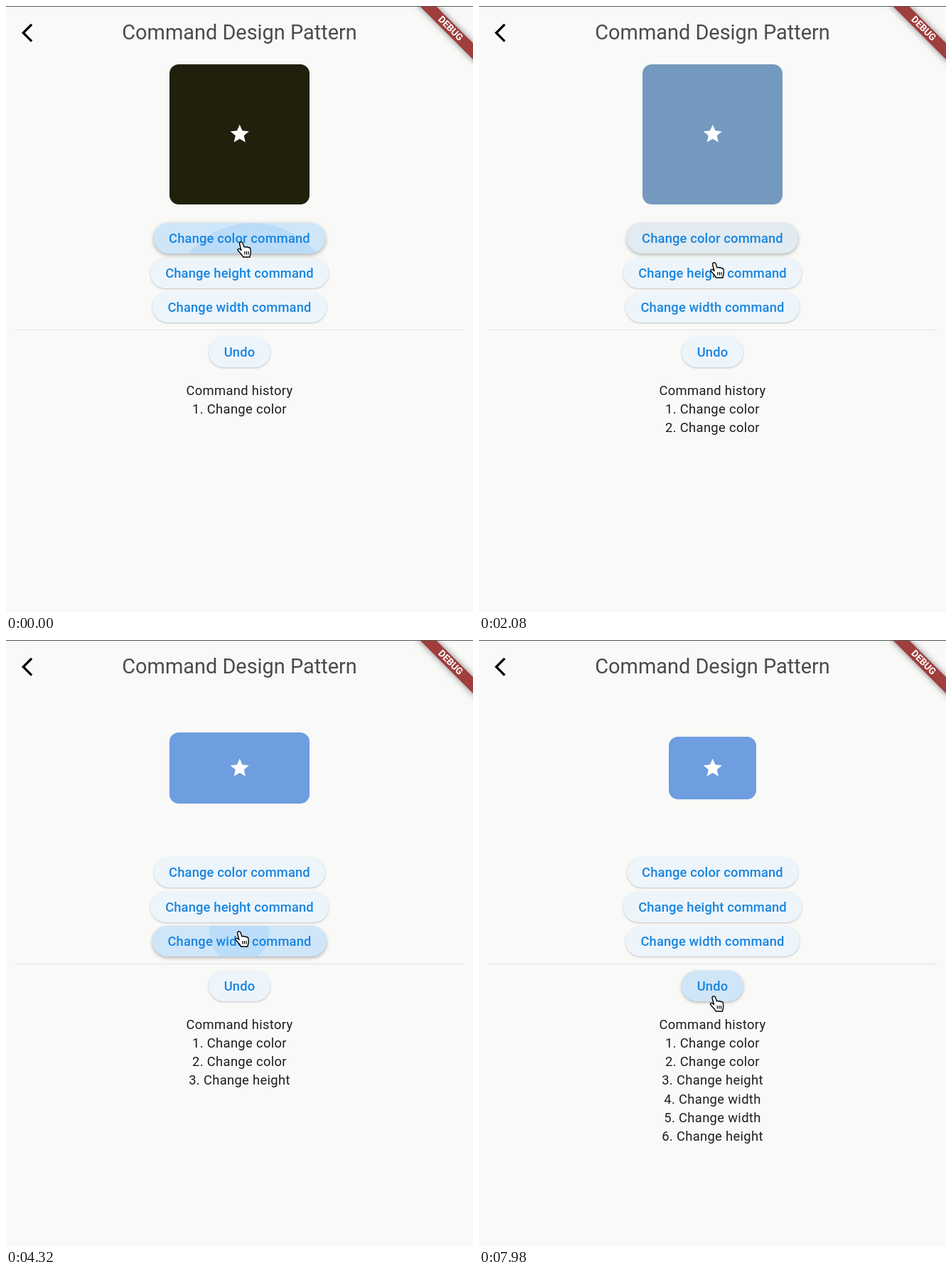
Recreate the animation shown at these times as an HTML page. Size 657 px wide and 852 px high, loop 8 s.

```html
<!DOCTYPE html>
<html lang="en">
<head>
<meta charset="utf-8">
<title>Command Design Pattern</title>
<style>
  html, body { margin: 0; width: 100%; height: 100%; overflow: hidden; }
  body { position: relative; background: #f9f9f8; font-family: Roboto, sans-serif; }
  body > * { position: absolute; }
  .rule { height: 1px; }
  #top { left: 0; top: 0; width: 657px; background: #555552; }
  #divider { left: 14px; top: 455px; width: 630px; background: #e2e2e1; }
  h1 {
    left: 0; top: 17px; width: 657px; margin: 0;
    font: 400 28.9px/40px Roboto, sans-serif; text-align: center; color: #4b4b4a;
  }
  #back { left: 21.7px; top: 22.2px; }
  #banner {
    left: 657px; top: 0; width: 0; height: 0; transform: rotate(45deg);
  }
  #banner span {
    position: absolute; left: -60px; top: 36.8px; width: 120px; height: 15.8px;
    font-size: 13.4px; line-height: 15.8px; font-weight: 700; text-align: center;
    color: #fff; background: #a03d3d; box-shadow: 0 0 10px rgba(0, 0, 0, .5);
  }
  #box { border-radius: 13px; }
  #star { left: 312.7px; top: 164.3px; }
  .button {
    height: 43px; border-radius: 22px; overflow: hidden;
    font-size: 18.39px; line-height: 43px; font-weight: 500; letter-spacing: .131px;
    text-align: center; white-space: nowrap; color: #1985e0;
  }
  .button span { position: relative; }
  .button i { position: absolute; border-radius: 50%; background: #2196f3; }
  #history {
    left: 0; top: 527.5px; width: 657px;
    font-size: 18.39px; line-height: 26.27px; letter-spacing: .328px;
    text-align: center; color: #1d1d1c;
  }
  #cursor { left: 0; top: 0; overflow: visible; }
</style>
</head>
<body>
<h1>Command Design Pattern</h1>
<svg id="back" width="31.5" height="31.5" viewBox="0 0 24 24">
  <path d="M11.67 3.87L9.9 2.1 0 12l9.9 9.9 1.77-1.77L3.54 12z"/>
</svg>
<div id="banner"><span>DEBUG</span></div>
<div id="top" class="rule"></div>
<div id="box"></div>
<svg id="star" width="31.5" height="31.5" viewBox="0 0 24 24" fill="#fff">
  <path d="M12 17.27L18.18 21l-1.64-7.03L22 9.24l-7.19-.61L12 2 9.19 8.63 2 9.24l5.46 4.73L5.82 21z"/>
</svg>
<div id="divider" class="rule"></div>
<div id="history"></div>
<svg id="cursor" width="21" height="24" fill="#fff" stroke="#000" stroke-width="1.4" stroke-linejoin="round">
  <path d="M4.5 1.2C5.8.2 7.4.9 8 2.3L10 8c.8-.8 2.3-.8 3 .2.9-.8 2.4-.6 3 .6 1-.6 2.4 0 2.8 1.4l.5 3.8c.2 3-1 4.5-1.3 8H8.6c-.6-2-3.1-4.5-4.8-6.4C2.4 14 .8 12.6.9 11.6 1.2 10.2 3.2 10 4.3 11L6 12.6 3.7 4C3.3 2.8 3.6 1.8 4.5 1.2z"/>
  <path d="M10.8 14v4.5M13.4 14v4.5M16 14v4.5" stroke-width="1.2"/>
</svg>
<script>
const LOOP = 8000, TICK_MS = 20, MORPH_TICKS = 25, CENTER_X = 328.5, CENTER_Y = 180;

// Ticks of 20 ms app time; hover lists [enter, leave] pairs.
const buttons = [
  { label: 'Change color command', top: 305, width: 241.5, hover: [[-50, 41]] },
  { label: 'Change height command', top: 353.5, width: 251.5, hover: [[45, 82], [132, 161]] },
  { label: 'Change width command', top: 402, width: 245.5, hover: [[84, 130]] },
  { label: 'Undo', top: 465, width: 87.5, hover: [[166, 999]] }
];
const clicks = [
  { button: 0, press: -10, release: -6, name: 'color', value: [138, 132, 52] },
  { button: 0, press: 14.5, release: 24, name: 'color', value: [110, 158, 224] },
  { button: 1, press: 55.5, release: 60, name: 'height', value: 100 },
  { button: 2, press: 88.5, release: 94, name: 'width', value: 129.8 },
  { button: 2, press: 120.5, release: 124, name: 'width', value: 123 },
  { button: 1, press: 141.5, release: 146, name: 'height', value: 88 }
];
const cursorPath = [
  [0, 325, 331], [36, 325, 331], [44, 325, 360], [48, 325, 373], [76, 325, 373],
  [86, 322, 409], [128, 322, 409], [137, 325, 376], [158, 325, 376], [170, 324.5, 500]
];

const $ = id => document.getElementById(id);
const clamp = v => Math.min(1, Math.max(0, v));
const lerp = (a, b, p) => a + (b - a) * p;
const mix = (a, b, p) => a.map((v, i) => lerp(v, b[i], p));
const rgb = c => `rgb(${c.map(Math.round)})`;

// Cubic Bezier (.25, .1, .25, 1), solved by bisection.
function ease(p) {
  if (p <= 0 || p >= 1) return clamp(p);
  const bezier = (a, b, s) => 3 * a * s * (1 - s) ** 2 + 3 * b * s * s * (1 - s) + s ** 3;
  let low = 0, high = 1;
  for (let i = 0; i < 20; i++) {
    const mid = (low + high) / 2;
    if (bezier(.25, .25, mid) < p) low = mid; else high = mid;
  }
  return bezier(.1, 1, low);
}

for (const b of buttons) {
  b.el = document.createElement('div');
  b.el.className = 'button';
  b.ripple = document.createElement('i');
  const text = document.createElement('span');
  text.textContent = b.label;
  b.el.append(b.ripple, text);
  b.left = CENTER_X - b.width / 2;
  Object.assign(b.el.style, { left: b.left + 'px', top: b.top + 'px', width: b.width + 'px' });
  document.body.insertBefore(b.el, $('cursor'));
}

function cursorAt(tick) {
  const next = cursorPath.findIndex(k => k[0] > tick);
  if (next < 0) return cursorPath.at(-1).slice(1);
  const [from, to] = [cursorPath[next - 1] || cursorPath[0], cursorPath[next]];
  return mix(from, to, (tick - from[0]) / (to[0] - from[0])).slice(1);
}

const level = (spans, tick, fade) => Math.max(...spans.map(
  ([enter, leave]) => clamp(Math.min((tick - enter) / fade, 1 - (tick - leave) / fade))));

function drawBox(tick) {
  const state = { color: [0, 0, 0], height: 197, width: 197 };
  for (const { name, value, release } of clicks) {
    const p = clamp((tick - release) / MORPH_TICKS);
    state[name] = name === 'color' ? mix(state.color, value, p) : lerp(state[name], value, p);
  }
  Object.assign($('box').style, {
    left: CENTER_X - state.width / 2 + 'px', top: CENTER_Y - state.height / 2 + 'px',
    width: state.width + 'px', height: state.height + 'px', background: rgb(state.color)
  });
}

function drawButton(b, index, tick) {
  const hover = level(b.hover, tick, 3), lift = level(b.hover, tick, 10);
  const base = mix([237, 245, 251], [220, 230, 237], lift);
  b.el.style.background = rgb(mix(base, [207, 230, 249], hover));
  b.el.style.boxShadow =
    `0 ${lerp(1, 2, lift)}px ${lerp(2.5, 6, lift)}px rgba(0,0,0,${lerp(.23, .32, lift)})`;

  const click = clicks.findLast(c => c.button === index && c.press <= tick);
  if (!click) { b.ripple.style.opacity = 0; return; }
  const held = (Math.min(tick, click.release) - click.press) * TICK_MS;
  const freed = Math.max(0, tick - click.release) * TICK_MS;
  const grown = ease(held / 1000 + freed / 225);
  const reach = Math.hypot(b.width, 43) / 2;
  const radius = lerp(reach * .3, reach + 5, grown);
  const [cx, cy] = cursorAt(click.press);
  Object.assign(b.ripple.style, {
    left: lerp(cx + 6 - b.left, b.width / 2, grown) - radius + 'px',
    top: lerp(cy + 2 - b.top, 21.5, grown) - radius + 'px',
    width: radius * 2 + 'px', height: radius * 2 + 'px',
    opacity: .12 * clamp((held + freed) / 75) * clamp((375 - freed) / 150)
  });
}

function drawHistory(tick) {
  const lines = clicks.filter(c => c.release <= tick).map((c, i) => `${i + 1}. Change ${c.name}`);
  const html = ['Command history', ...lines].join('<br>');
  if ($('history').innerHTML !== html) $('history').innerHTML = html;
}

// Three ticks are shown per 140 ms, the middle one held for 100 ms.
function tickAt(time) {
  const phase = time % 140;
  return 3 * Math.floor(time / 140) + (phase < 20 ? 0 : phase < 120 ? 1 : 2);
}

const start = performance.now();
function draw() {
  const tick = tickAt((performance.now() - start) % LOOP);
  drawBox(tick);
  buttons.forEach((b, i) => drawButton(b, i, tick));
  drawHistory(tick);
  const [x, y] = cursorAt(tick);
  $('cursor').style.transform = `translate(${x}px, ${y}px)`;
  requestAnimationFrame(draw);
}
draw();
</script>
</body>
</html>
```
